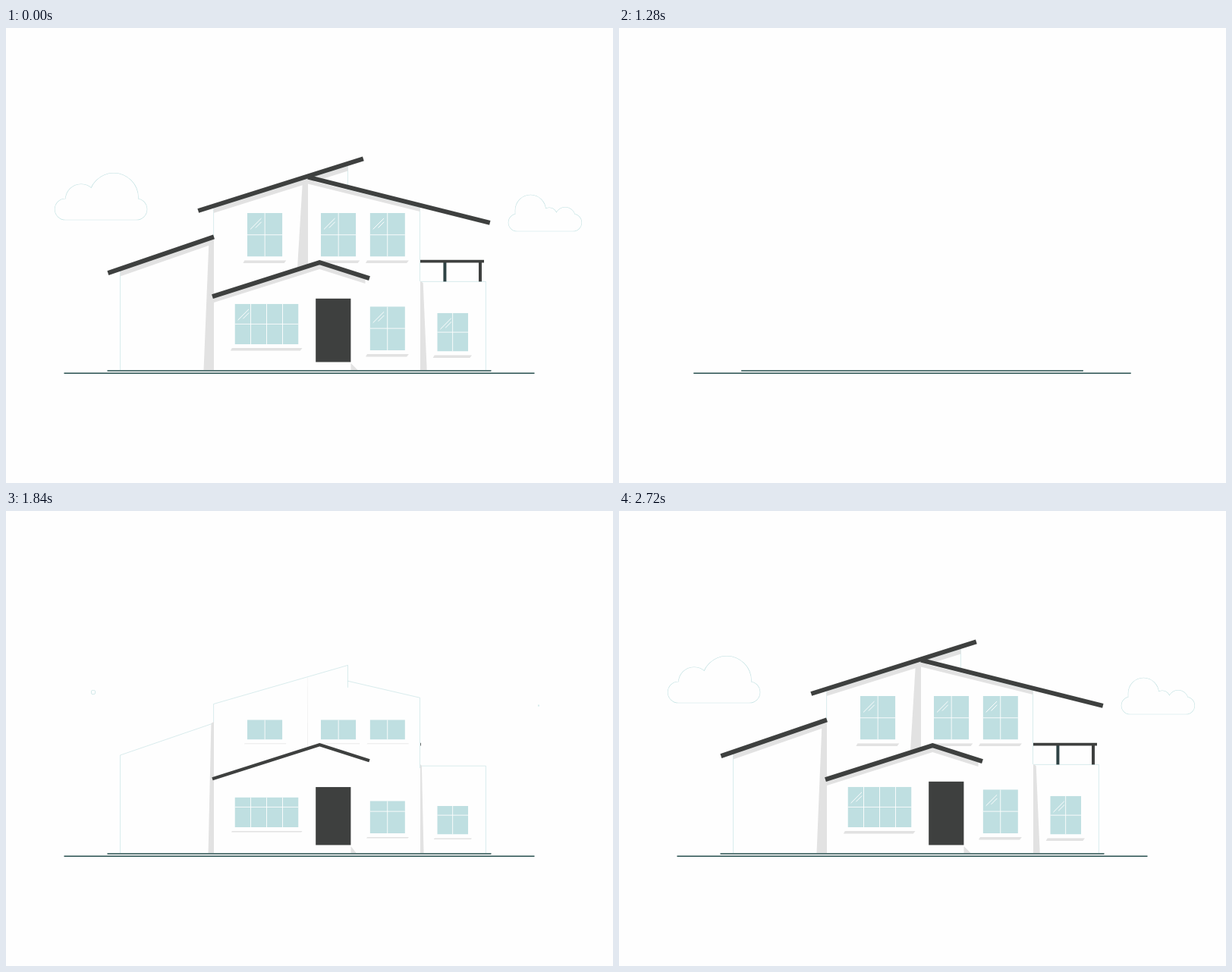
An HTML page with a canvas that plays this animation: 800 px wide and 600 px high, repeating every 3.48 s.

```html
<!DOCTYPE html>
<html lang="en">
<head>
<meta charset="utf-8">
<title>House</title>
<style>
  html, body { margin: 0; width: 100%; height: 100%; overflow: hidden; background: #fefefe; }
  canvas { display: block; width: 800px; height: 600px; }
</style>
</head>
<body>
<canvas id="stage" width="800" height="600"></canvas>
<script>
const ctx = document.getElementById('stage').getContext('2d');
const LOOP = 3480, STEP = 40, HOLD = 720, DONE = 2760, GROUND = 451;
const WHITE = '#fefefe', DARK = '#3e403f', SHADE = '#e2e2e2', GLASS = '#bfdfe1',
      EDGE = '#bfe0e1', TEAL = '#28504f', POST = '#2f4345';

// cubic-bezier(.25, .1, .25, 1), solved by bisection
function ease(p) {
  let lo = 0, hi = 1, u = p;
  for (let i = 0; i < 20; i++) {
    u = (lo + hi) / 2;
    if (0.75 * u * (1 - u) + u ** 3 < p) lo = u; else hi = u;
  }
  return 0.3 * u * (1 - u) ** 2 + 3 * u * u * (1 - u) + u ** 3;
}
const sine = p => (1 - Math.cos(Math.PI * p)) / 2;
const mix = (a, b, k) => a + (b - a) * k;
const lift = (y, s) => GROUND - (GROUND - y) * s;

let time = 0;
function grow(start, dur, curve = ease) {
  const p = (time - start) / dur;
  return p <= 0 ? 0 : p >= 1 ? 1 : curve(p);
}

function trace(pts) {
  ctx.beginPath();
  pts.forEach(([x, y]) => ctx.lineTo(x, y));
}
function fill(pts, color) {
  trace(pts);
  ctx.fillStyle = color;
  ctx.fill();
}
function line(pts, color, width) {
  if (width <= 0) return;
  trace(pts);
  ctx.strokeStyle = color;
  ctx.lineWidth = width;
  ctx.stroke();
}
function box(x, y, w, h, color) {
  ctx.fillStyle = color;
  ctx.fillRect(x, y, w, h);
}

// Roof beam thickening downwards from its top edge
function beam(pts, k) {
  line(pts.map(([x, y]) => [x, y + 3.1 * k]), DARK, 6 * k);
}
// Shadow hanging below a line
function band(pts, drop, k) {
  const low = pts.map(([x, y]) => [x, y + drop * k]).reverse();
  if (k > 0) fill([...pts, ...low], SHADE);
}
// Upright shadow widening from x towards its foot
function taper(x, top, head, foot, k, bottom = GROUND) {
  if (k > 0) fill([[x, top], [x + head * k, top + 2], [x + foot * k, bottom], [x, bottom]], SHADE);
}
function wall(pts, s) {
  if (s > 0) line(pts.map(([x, y]) => [x, lift(y, s)]), EDGE, 0.6);
}

function glint(cx, cy, r, k) {
  line([[cx - r * k, cy + r * k], [cx + r * k, cy - r * k]], WHITE, k > 0 ? 1 : 0);
}

// Glass opens upwards, its sill follows
function pane(x, y, w, h, cols, start) {
  const k = grow(start, 415, sine), sill = grow(start + 75, 415, sine);
  ctx.save();
  ctx.beginPath();
  ctx.rect(x, y + h * (1 - k), w, h * k);
  ctx.clip();
  box(x, y, w, h, GLASS);
  for (let i = 1; i < cols; i++) {
    const cx = x + w * i / cols;
    line([[cx, y], [cx, y + h]], WHITE, 0.9);
  }
  line([[x, y + h / 2], [x + w, y + h / 2]], WHITE, 0.9);
  const shine = grow(1970, 360);
  glint(x + 11.3, y + 14.2, 7.2, shine);
  glint(x + 14.8, y + 15.6, 3.9, shine);
  ctx.restore();

  const l = x - 3.6, r = x + w + 5, b = y + h + 5;
  if (sill > 0) {
    fill([[l, b], [r, b], [r - 2.7 * sill, b + 3.5 * sill], [l - 2 * sill, b + 3.5 * sill]], SHADE);
  }
}

// A disc at x widens into a pill from left to right, then domes rise from it
function cloud(x, y, rad, left, right, wide, domes) {
  if (rad <= 0) return;
  const l = mix(x - rad, left, wide), r = mix(x + rad, right, wide);
  const path = new Path2D();
  path.roundRect(l, y - rad, r - l, rad * 2, rad);
  domes.forEach(([cx, cy, size], i) => {
    const k = grow(2150 + 40 * i, 520), d = size * k;
    if (k <= 0) return;
    path.moveTo(cx - d, y);
    path.arc(cx, cy, d, Math.PI, 0);
    path.lineTo(cx + d, y);
    path.closePath();
  });
  ctx.strokeStyle = EDGE;
  ctx.lineWidth = 1.1;
  ctx.stroke(path);
  ctx.fillStyle = WHITE;
  ctx.fill(path);
}

const WING = [[150.5, 320], [274, 277]];
const LEFT = [[273.6, 237.5], [450.5, 182]];
const RIGHT = [[398, 200.5], [545.5, 237]];
const PORCH = [[272, 351], [413.3, 306], [479, 327]];

function walls() {
  const wing = grow(1280, 667), left = grow(1320, 790), right = grow(1325, 696);
  wall([[150.5, GROUND], ...WING], wing);
  if (left > 0) {
    const foot = lift(lift(277, wing), 1 / left);
    wall([[273.6, foot], ...LEFT, [450.5, 214]], left);
  }
  wall([[450.5, 214], RIGHT[1], [545.5, 334]], right);
  wall([[546, 334.4], [632.4, 334.4], [632.4, GROUND]], wing);

  taper(274, 278, -6.5, -13.5, grow(1690, 470));
  taper(398, lift(198.5, left), -7, -14, grow(1822, 340), 317);
  taper(546, 334, 3.7, 8.7, grow(1700, 460));
  taper(454.5, 440, 0, 9, grow(1680, 330));
}

function openings() {
  for (const x of [318, 415, 479.6]) pane(x, 244, 46.3, 57.5, 2, 1645);
  pane(301.5, 363.8, 84, 53.2, 4, 1567);
  pane(479.6, 367.3, 46.3, 57.7, 2, 1567);
  pane(568.3, 375.8, 40.7, 50.7, 2, 1567);
  const door = 83.7 * grow(1545, 457);
  box(408.2, 440.5 - door, 46.2, door, DARK);
}

function roofs() {
  const shadow = grow(2085, 270), roof = grow(1992, 350);
  band(WING, 7.5, shadow);
  band(LEFT, 6.5, shadow);
  band(RIGHT, 5, grow(2020, 320));
  band([[274, 356], [413.3, 312], [473.5, 331]], 6, grow(1845, 260));

  beam([[134.4, 320], [274, 272.3]], roof);
  beam([[398, 193.6], [637.8, 253.7]], roof);
  beam([[253.3, 237.9], [470.9, 169.2]], roof);
  beam(PORCH, grow(1638, 470));
}

function balcony() {
  const post = (x, start, color) => {
    const h = 27 * grow(start, 300, sine);
    box(x, 334.4 - h, 4, h, color);
  };
  post(576.4, 1886, POST);
  post(623, 1965, DARK);
  box(546, 305.8, 84 * grow(1810, 500, sine), 3.7, DARK);
}

function ground(half, y, start) {
  const w = half * grow(start, 720);
  box(386.5 - w, y, 2 * w, 1.5, TEAL);
}

function draw(t) {
  time = t < HOLD ? DONE : t;
  box(0, 0, 800, 600, WHITE);
  cloud(115, 239, 13.8 * grow(1802, 260), 64.5, 185.7, grow(1973, 475, sine),
    [[99, 226.5, 20.5], [142, 223.7, 32.2]]);
  cloud(702, 256.6, 11.2 * grow(1815, 400), 662.3, 758.5, grow(2082, 420),
    [[691.3, 240.3, 20], [716, 247, 10], [737, 249.5, 13]]);
  walls();
  openings();
  roofs();
  balcony();
  ground(253, 451.2, 842);
  ground(310, 454.5, 793);
}

const began = performance.now();
function frame() {
  const t = (performance.now() - began) % LOOP;
  draw(Math.floor(t / STEP) * STEP);
  requestAnimationFrame(frame);
}
frame();
</script>
</body>
</html>
```
